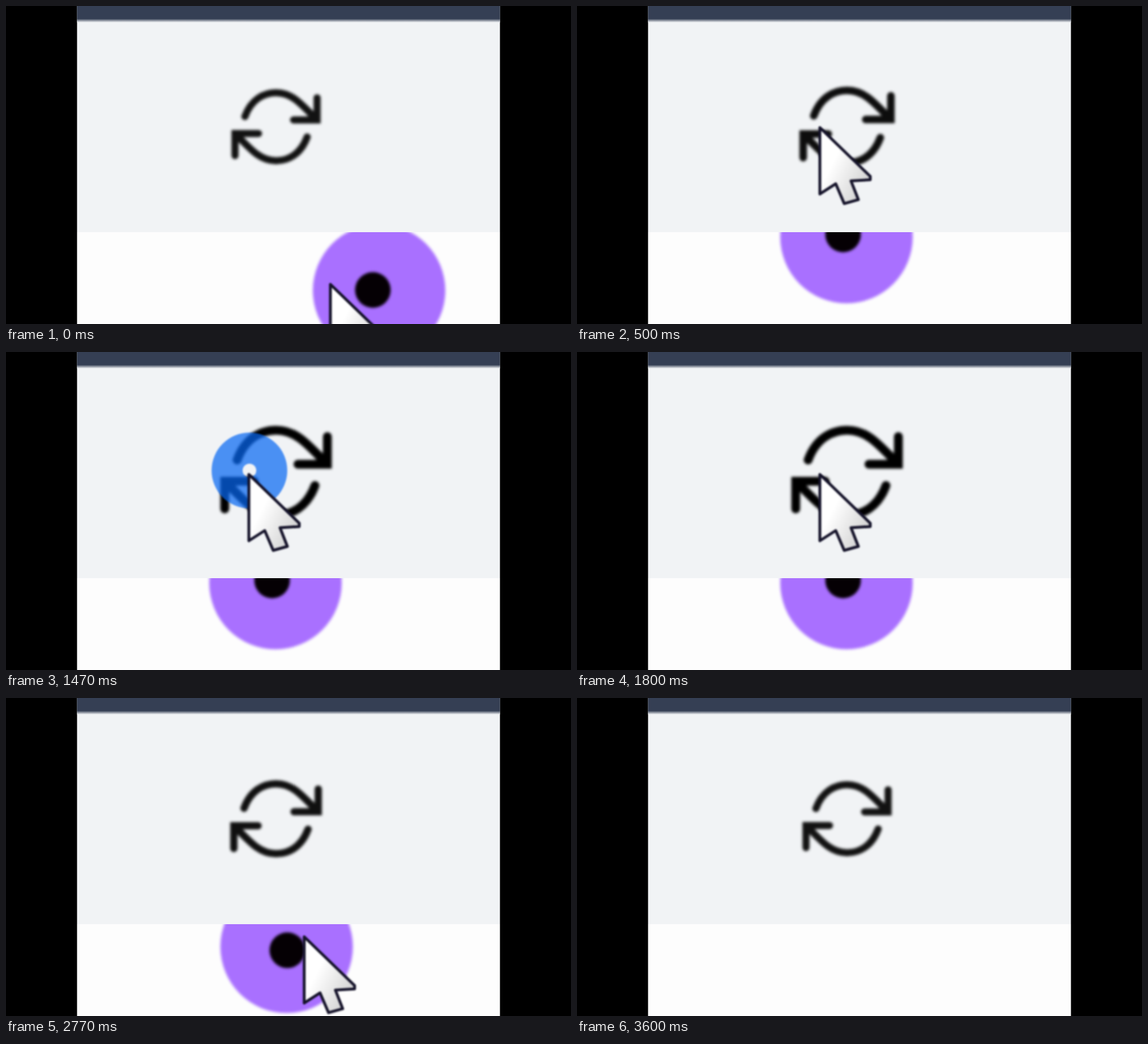
Animation of 998 by 561 pixels, one loop 3.88 s. Source, as an HTML page:

```html
<!DOCTYPE html>
<html lang="en">
<head>
<meta charset="utf-8">
<title>Refresh button</title>
<style>
  html, body { margin: 0; height: 100%; overflow: hidden; background: #000; }
  svg { display: block; width: 998px; height: 561px; }
</style>
</head>
<body>
<svg viewBox="0 0 998 561">
  <defs>
    <linearGradient id="edge" x1="0" y1="0" x2="0" y2="1">
      <stop offset="0" stop-color="#353f54"/>
      <stop offset="1" stop-color="#f1f3f5"/>
    </linearGradient>
    <linearGradient id="shade" x1="0" y1="0.3" x2="0.8" y2="0.9">
      <stop offset="0.3" stop-color="#fff"/>
      <stop offset="1" stop-color="#d4d4d4"/>
    </linearGradient>
    <filter id="soft" x="-20%" y="-20%" width="140%" height="140%" color-interpolation-filters="sRGB">
      <feGaussianBlur stdDeviation="2.5"/>
    </filter>
    <filter id="crisp" x="-20%" y="-20%" width="140%" height="140%" color-interpolation-filters="sRGB">
      <feGaussianBlur stdDeviation="1.7"/>
    </filter>
    <clipPath id="page"><path d="M125 399H873V561H125z"/></clipPath>
    <path id="arrow" d="M-55 -18C-44 -48 -22 -60 0 -60C28 -60 44 -41 72 -12M72.5 -51V-12H31"/>
  </defs>

  <path fill="#f1f3f5" d="M125.5 0H872.5V399H125.5z"/>
  <path fill="#353f54" d="M125.5 0H872.5V23H125.5z"/>
  <path fill="url(#edge)" d="M125.5 22.5H872.5V29H125.5z"/>
  <path fill="#fdfdfd" d="M125.5 399H872.5V561H125.5z"/>

  <g clip-path="url(#page)">
    <circle id="halo" r="117" fill="#a970ff" filter="url(#soft)"/>
    <circle id="dot" r="31.5" fill="#050004" filter="url(#soft)"/>
  </g>

  <g filter="url(#soft)">
    <g id="icon" fill="none" stroke-width="12.5" stroke-linecap="round">
      <use href="#arrow"/>
      <use href="#arrow" transform="rotate(180)"/>
    </g>
  </g>

  <path id="ripple" fill="#0768f3" fill-rule="evenodd" filter="url(#crisp)"/>

  <path id="cursor" d="M1 3L90 89V95L56 97L69 130L44 137L29 102L1 120z" fill="url(#shade)"
    stroke="#15132a" stroke-width="5" stroke-linejoin="round" filter="url(#crisp)"/>
</svg>
<script>
const LOOP = 3880, FRAME = 100 / 3;
const LEAVE = 2520, EXIT = [660, 700];
const $ = id => document.getElementById(id);
const progress = (t, start, length) => Math.max(0, Math.min(1, (t - start) / length));
const mix = (a, b, k) => a + (b - a) * k;
const between = (p, q, k) => [mix(p[0], q[0], k), mix(p[1], q[1], k)];
const wave = k => (1 - Math.cos(Math.PI * k)) / 2;
const easeOut = k => 1 - (1 - k) ** 1.6;

const place = (id, [x, y], scale = 1) =>
  $(id).setAttribute("transform", `translate(${x} ${y}) scale(${scale})`);

// The pointer sweeps in, settles on the icon, dips with the click and speeds away.
function pointer(t) {
  const x = mix(572, 428, easeOut(progress(t, 0, 291)));
  const y = mix(502, 205, wave(progress(t, -91, 653))) + 8 * wave(progress(t, 1350, 100));
  return between([x, y], EXIT, progress(t, LEAVE, 380) ** 2);
}

// Followers only hear the pointer inside the page, so they park at its edge.
const follow = (t, from, parked, settle) =>
  between(between(from, parked, easeOut(progress(t, 0, settle))), EXIT, wave(progress(t, LEAVE + 200, settle)));

const ring = r => `M${430 - r} 209a${r} ${r} 0 1 0 ${2 * r} 0a${r} ${r} 0 1 0 ${-2 * r} 0z`;

function draw(t) {
  place("cursor", pointer(t));
  place("halo", follow(t, [659, 502], [476, 407.5], 220));
  place("dot", follow(t, [648, 501], [470, 403], 190));

  const hover = wave(progress(t, 430, 200)) - wave(progress(t, LEAVE + 90, 200));
  const ink = mix(18, 0, hover);
  place("icon", [477, 213], 1 + 0.25 * hover);
  $("icon").setAttribute("stroke", `rgb(${ink},${ink},${ink})`);

  const p = progress(t, 1371, 312), radius = 218 * p;
  $("ripple").setAttribute("d", p > 0 && p < 1 ? ring(radius) + ring(radius * p ** 1.45) : "");
  $("ripple").setAttribute("opacity", Math.min(0.71, 1.04 * (1 - p)));
}

function tick() {
  const t = performance.now() % LOOP;
  draw(Math.floor((t + 4) / FRAME) * FRAME);
  requestAnimationFrame(tick);
}
tick();
</script>
</body>
</html>
```
